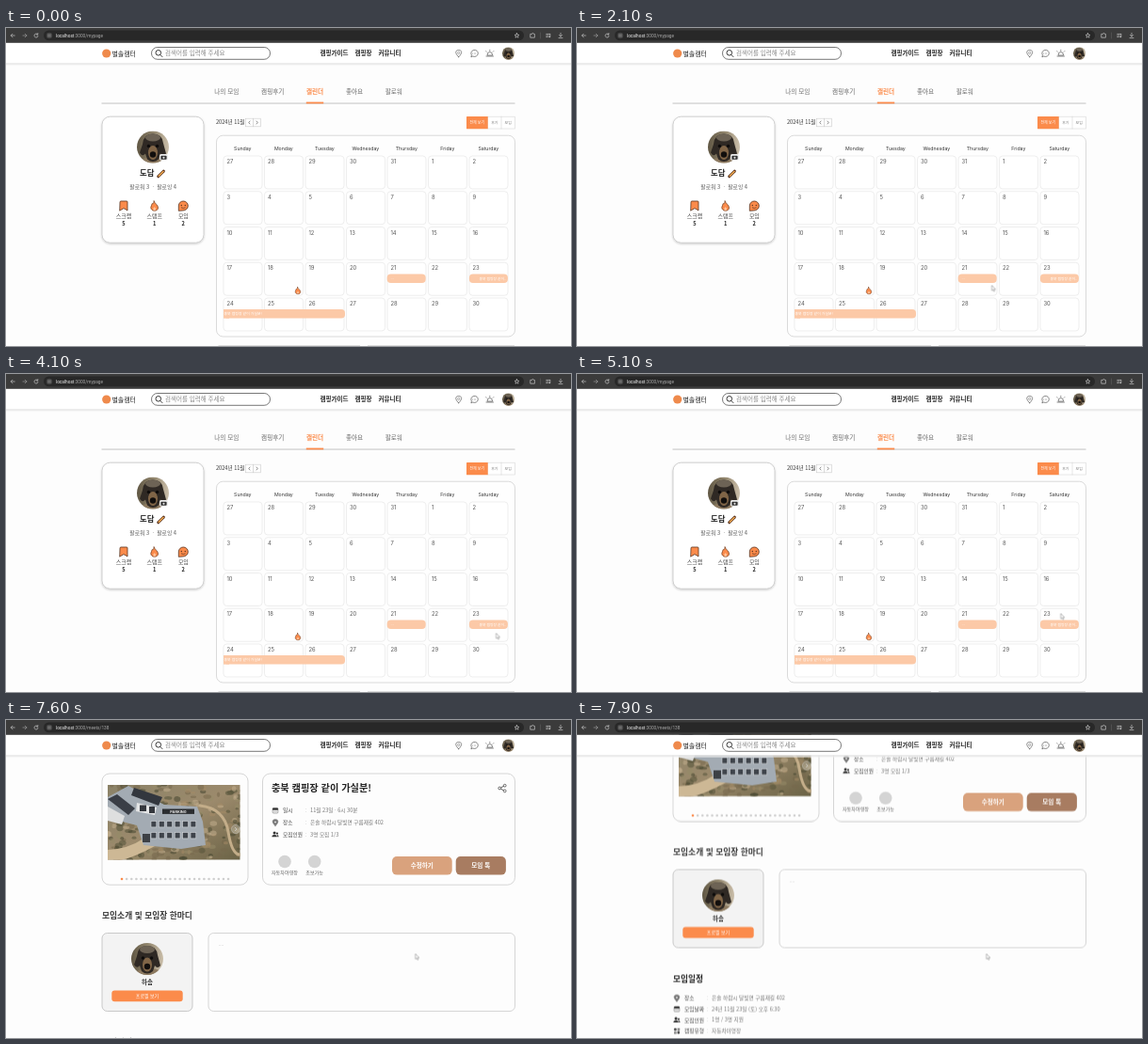
Write an HTML page that moves like this. It is 600 px wide and 338 px high and loops after 8000 ms.

```html
<!DOCTYPE html>
<html lang="ko">
<head>
<meta charset="utf-8">
<title>캠핑 캘린더</title>
<style>
html, body { margin: 0; width: 100%; height: 100%; overflow: hidden; background: #fdfdfd; }
svg { display: block; width: 600px; height: 338px; }
text { font-family: "Noto Sans CJK KR", "Noto Sans CJK", "Inter", sans-serif; }
.latin { font-family: "Inter", sans-serif; }
.url { font-family: "Roboto", sans-serif; }
.anim { animation: 8s linear infinite; }
#calendarPage, .calendarOnly { animation-name: leave; animation-timing-function: step-end; }
#meetPage, .meetOnly { animation-name: enter; animation-timing-function: step-end; }
#guest { animation-name: guest; animation-timing-function: step-end; }
#host { animation-name: host; animation-timing-function: step-end; }
#scroller { animation-name: scroll; }
#cursor { animation-name: move; }
#cursor path { animation-name: appear; animation-timing-function: step-end; }
@keyframes leave { 0% { opacity: 1 } 72.5%, 100% { opacity: 0 } }
@keyframes enter { 0% { opacity: 0 } 72.5%, 100% { opacity: 1 } }
@keyframes guest { 0% { opacity: 1 } 77.5%, 100% { opacity: 0 } }
@keyframes host { 0% { opacity: 0 } 77.5%, 100% { opacity: 1 } }
@keyframes appear { 0% { opacity: 0 } 5%, 100% { opacity: 1 } }
@keyframes scroll {
  0%, 95.2% { transform: translateY(0); animation-timing-function: cubic-bezier(.4, .2, .5, 1) }
  98.75%, 100% { transform: translateY(-67.5px) }
}
@keyframes move {
  0%, 10% { transform: translate(505px, 264px) }
  20%, 21.25% { transform: translate(268px, 296px) }
  26.25%, 31.25% { transform: translate(440.5px, 273.5px) }
  33.75% { transform: translate(512px, 273px) }
  37.5%, 60% { transform: translate(520.5px, 275.5px) }
  63.75% { transform: translate(513.7px, 254.5px) }
  67.5% { transform: translate(514px, 262px) }
  71.25%, 75% { transform: translate(515.5px, 264.5px) }
  82.5% { transform: translate(497px, 272px) }
  87.5%, 100% { transform: translate(434.7px, 248.5px) }
}
</style>
</head>
<body>
<svg id="stage" viewBox="0 0 600 338"></svg>
<script>
const ORANGE = '#fb8b4b', INK = '#222', GRAY = '#777';

const text = (x, y, str, size, { fill = INK, weight = 400, anchor = 'start', cls = '' } = {}) =>
  `<text class="${cls}" x="${x}" y="${y + size * 0.37}" font-size="${size}" font-weight="${weight}" fill="${fill}" text-anchor="${anchor}">${str}</text>`;
const mid = (x, y, str, size, opts) => text(x, y, str, size, { ...opts, anchor: 'middle' });
const rect = (x, y, w, h, r, fill, stroke = 'none', sw = 0.7, extra = '') =>
  `<rect x="${x}" y="${y}" width="${w}" height="${h}" rx="${r}" fill="${fill}" stroke="${stroke}" stroke-width="${sw}" ${extra}/>`;
const circle = (x, y, r, fill, stroke = 'none', sw = 0.7) =>
  `<circle cx="${x}" cy="${y}" r="${r}" fill="${fill}" stroke="${stroke}" stroke-width="${sw}"/>`;
const path = (d, stroke, sw = 0.8, fill = 'none') =>
  `<path d="${d}" fill="${fill}" stroke="${stroke}" stroke-width="${sw}" stroke-linecap="round" stroke-linejoin="round"/>`;
const shape = (d, fill) => `<path d="${d}" fill="${fill}"/>`;
const at = (x, y, body, scale = 1) => `<g transform="translate(${x} ${y}) scale(${scale})">${body}</g>`;
const group = (id, cls, body) => `<g id="${id}" class="${cls}">${body}</g>`;
const range = (n, fn) => Array.from({ length: n }, (_, i) => fn(i)).join('');

// Icons are centred on 0,0.
const pin = (stroke, fill, hole) => path('M0 4C-5 -1 -3.4 -3.7 0 -3.7S5 -1 0 4Z', stroke, 0.7, fill) + circle(0, -0.6, 1.2, hole, stroke, 0.5);
const flame = path('M-.6 -5C0 -2.5 3.8 -1 3.8 2C3.8 4.2 2 5.2 0 5.2S-3.9 4 -3.9 1.8C-3.9 0 -2.6 -.8 -2.5 -2.4C-1.2 -1.7 -.6 -3 -.6 -5Z', '#7a4425', 0.8, ORANGE)
  + shape('M0 5C-2 4.5 -1.8 2.5 0 1.2C1.8 2.5 2 4.5 0 5Z', '#ffc39a');
const bookmark = path('M-4 -4.2Q-4 -5 -3 -5H3Q4 -5 4 -4.2V5L0 2.6L-4 5Z', '#5a3420', 0.8, ORANGE);
const talk = path('M-5 5V0A5 5 0 1 1 0 5Z', '#5a3420', 0.8, ORANGE)
  + circle(-2, -0.5, 0.7, '#5a3420') + circle(2, -0.5, 0.7, '#5a3420') + path('M-2 2Q0 3.2 2 2', '#5a3420', 0.7);
const dateIcon = rect(-3.2, -3, 6.4, 6, 1, '#fff', '#666', 0.6) + rect(-3.2, -3, 6.4, 2.5, 0.8, '#333') + path('M-2 1H2', '#777', 0.6);
const people = circle(-1, -1.7, 1.7, '#333') + shape('M-4 3Q-4 .5 -1 .5T2 3Z', '#333')
  + circle(2.2, -1, 1.2, '#333') + shape('M2.5 3Q2.5 1 1.8 .6Q4 .5 4 3Z', '#333');
const kinds = circle(-1.8, -1.8, 1.6, '#444') + rect(0.6, -3.3, 3, 3, 0.6, '#888') + rect(-3.3, 0.6, 3, 3, 0.6, '#888') + circle(2, 2, 1.6, '#444');
const place = pin('#777', '#777', '#fff');

const dog = `<g clip-path="url(#round)">${rect(-17, -17, 34, 34, 0, 'url(#fur)')}
  <ellipse cx="2" cy="17" rx="15" ry="7" fill="#8d7a60"/>
  ${shape('M-11 -3Q-10 -14 0 -14T11 -4L14 7Q11 11 8 7L6 13Q0 18 -6 13L-8 7Q-11 11 -14 6Z', '#2f2924')}
  <ellipse cx="0" cy="-10" rx="8" ry="4" fill="#6d6355"/>
  <ellipse cx="0" cy="6" rx="5" ry="7.5" fill="#806547"/>
  <ellipse cx="0" cy="8" rx="3.2" ry="3.2" fill="#120f0d"/>
  ${circle(-4.6, -1, 1.7, '#0d0b0a')}${circle(4.6, -1, 1.7, '#0d0b0a')}</g>`;

const defs = `<defs>
  <clipPath id="round"><circle r="17"/></clipPath>
  <clipPath id="photo"><rect x="108" y="69" width="140.5" height="79.5"/></clipPath>
  <linearGradient id="fur"><stop stop-color="#5f5643"/><stop offset=".55" stop-color="#94886f"/><stop offset="1" stop-color="#cbbfab"/></linearGradient>
  <linearGradient id="woods" x2="1" y2="1"><stop stop-color="#8b8268"/><stop offset=".5" stop-color="#9c8a6c"/><stop offset="1" stop-color="#6a6245"/></linearGradient>
  <filter id="shade" x="-10%" y="-10%" width="120%" height="125%"><feDropShadow dx="0" dy="1" stdDeviation="1" flood-opacity=".22"/></filter>
</defs>`;

function browserBar() {
  const pale = '#c4c4c4';
  const icon = (d, color = pale) => path(d, color, 0.7);
  const url = (page, cls) => `<g class="anim ${cls}"><text class="url" x="53" y="9.7" font-size="4.75" fill="#aaa"><tspan fill="#f2f2f2">localhost</tspan>:3000/${page}</text></g>`;
  return rect(0, 0, 600, 15.8, 0, '#3b3b3b') + rect(40, 2.5, 510, 10.8, 5.4, '#282828')
    + icon('M9.2 8H5.2M7 6.2L5.2 8L7 9.8') + icon('M18 8H22M20.2 6.2L22 8L20.2 9.8', '#9a9a9a')
    + icon('M33.6 6.8A2 2 0 1 0 34 8.5M33.8 5.6V7H32.4')
    + circle(46, 8, 3.2, '#444') + path('M44.6 7.1H47.4M44.6 8.9H47.4', pale, 0.5)
    + url('mypage', 'calendarOnly') + url('meets/138', 'meetOnly')
    + icon('M542.5 5.6L543.2 7.2L544.9 7.4L543.6 8.5L544 10.2L542.5 9.3L541 10.2L541.4 8.5L540.1 7.4L541.8 7.2Z')
    + icon('M557.2 6.4H558.6A.9 .9 0 0 1 560.4 6.4H561.4V10.2H557.2Z') + path('M567.5 5V11', '#666', 0.5)
    + icon('M573.8 6.4H577.6M573.8 8H576M573.8 9.6H575.2M577.8 6.4V9.2') + circle(577.2, 9.4, 0.8, pale)
    + icon('M589 5.3V9M587.4 7.5L589 9.1L590.6 7.5M587 10.6H591');
}

function siteHeader() {
  const menu = { weight: 700 };
  return rect(0, 15.8, 600, 22, 0, '#fff') + rect(0, 37.6, 600, 0.9, 0, '#cfcfcf') + rect(0, 38.5, 600, 1, 0, '#efefef')
    + circle(106.7, 27, 4.6, '#ef8a4c') + text(112.5, 27, '별솔캠터', 6.9, { weight: 500 })
    + rect(154.5, 20.5, 126, 12.8, 6.4, '#fff', '#555', 0.8)
    + circle(161.8, 26.3, 2.8, 'none', '#222', 0.9) + path('M164 28.6L166 30.6', '#222', 0.9)
    + text(169, 26.8, '검색어를 입력해 주세요', 6.5, { fill: '#888' })
    + text(333.5, 26.5, '캠핑가이드', 6.5, menu) + text(370.5, 26.5, '캠핑장', 6.5, menu) + text(395.5, 26.5, '커뮤니티', 6.5, menu)
    + at(480.7, 27, pin('#555', 'none', 'none'), 0.95)
    + path('M494 30.5L494.4 28.8A3.7 3.6 0 1 1 496 30.2Z', '#555', 0.7)
    + range(3, i => circle(495.7 + i * 1.5, 27, 0.4, '#555'))
    + path('M510 30H517.5M511 28.7Q511 25.5 513.8 25.5T516.6 28.7ZM513.8 24.3V23.3M510.4 25.2L509.8 24.6M517.2 25.2L517.8 24.6', '#555', 0.7)
    + at(533.6, 27, dog, 0.39);
}

function profileCard() {
  const stat = (x, icon, label, n) => at(x, 189, icon) + mid(x, 199.5, label, 5.9, { fill: '#444' }) + mid(x, 208.3, n, 5.7, { weight: 700 });
  return rect(102, 94.2, 108, 134, 8.5, '#fff', '#bdbdbd', 0.7, 'filter="url(#shade)"')
    + at(156, 126.5, dog)
    + rect(163, 134, 9, 6.8, 2, '#eee') + rect(164.4, 135.8, 6.2, 4, 0.8, '#333') + circle(167.5, 137.8, 1.1, '#ddd')
    + text(142, 154.2, '도담', 8.4, { weight: 700 })
    + path('M161.7 157.8L167.3 152.2', '#5a3420', 3) + path('M162.3 157.2L167 152.5', '#f0a84f', 1.6)
    + mid(156.2, 169, '팔로워 3 &nbsp;·&nbsp; 팔로잉 4', 5.8, { fill: '#555' })
    + stat(125, bookmark, '스크랩', 5) + stat(157.7, flame, '스탬프', 1) + stat(188.3, talk, '모임', 2);
}

function calendar() {
  const days = ['Sunday', 'Monday', 'Tuesday', 'Wednesday', 'Thursday', 'Friday', 'Saturday'];
  const colX = c => 231 + c * 43.5, rowY = r => 136 + r * 37.75;
  const dayOf = i => i < 5 ? 27 + i : i - 4;
  const event = (x, y, w) => rect(x, y, w, 9.6, 4, '#fcc9a7');
  const white = { fill: '#fff', weight: 500 };
  return text(223, 100.3, '2024년 11월', 5.6, { fill: '#333' })
    + rect(254.5, 96.2, 8, 8.6, 0, '#fff', '#ccc', 0.6) + rect(262.5, 96.2, 8, 8.6, 0, '#fff', '#ccc', 0.6)
    + path('M259 99L257.8 100.5L259 102M266 99L267.2 100.5L266 102', '#444', 0.6)
    + rect(511.5, 94.2, 29, 12.8, 0, '#fff', '#d5d5d5', 0.6) + path('M526 94.2V107', '#d5d5d5', 0.6)
    + rect(489, 94, 22.7, 13.2, 0.5, ORANGE)
    + mid(500.3, 100.5, '전체 보기', 4, white) + mid(518.8, 100.5, '후기', 3.9, { fill: GRAY }) + mid(533.2, 100.5, '모임', 3.9, { fill: GRAY })
    + rect(223.5, 114.2, 317, 213.8, 7, '#fefefe', '#cacaca')
    + days.map((d, c) => mid(colX(c) + 20.3, 128.3, d, 5.2, { fill: '#333', cls: 'latin' })).join('')
    + range(35, i => {
      const x = colX(i % 7), y = rowY(Math.floor(i / 7));
      return rect(x, y, 41, 35, 3.5, '#fff', '#e3e3e3', 0.6) + text(x + 3.5, y + 6, dayOf(i), 5.8, { fill: '#555', cls: 'latin' });
    })
    + event(404.7, 261.5, 41) + text(408.5, 266.2, '···', 4, white)
    + event(491.9, 261.5, 41) + text(502.5, 266.2, '충북 캠핑장 같이..', 3.8, white)
    + event(231, 299, 129) + rect(231, 299, 6, 9.6, 0, '#fcc9a7') + text(231.5, 303.8, '충북 캠핑장 같이 가실분!', 3.9, white)
    + at(310, 279, flame, 0.72);
}

function calendarPage() {
  const tabs = [[234.3, '나의 모임'], [283.2, '캠핑후기'], [328, '캘린더'], [370, '좋아요'], [411.8, '팔로워']];
  return rect(0, 38, 600, 300, 0, '#fdfdfd')
    + tabs.map(([x, name], i) => mid(x, 67.2, name, 6.6, i === 2 ? { fill: ORANGE, weight: 700 } : { fill: '#666' })).join('')
    + rect(101.5, 79.6, 439, 0.9, 0, '#bcbcbc') + rect(318.8, 78.6, 18.4, 1.8, 0, ORANGE)
    + profileCard() + calendar()
    + rect(225.5, 337.2, 150.5, 0.8, 0, '#d5d5d5') + rect(384, 337.2, 156, 0.8, 0, '#d5d5d5');
}

function campPhoto() {
  const tones = ['#55533a', '#c2ad8c', '#77694e', '#968a69', '#454630', '#a58a66'];
  const rnd = i => { const v = Math.sin(i * 91.7) * 4375.5; return v - Math.floor(v); };
  const bushes = range(260, i => `<ellipse cx="${108 + rnd(i) * 141}" cy="${69 + rnd(i + 300) * 80}" rx="${1.5 + rnd(i + 600) * 3}" ry="${1 + rnd(i + 900) * 2.5}" fill="${tones[i % 6]}" opacity=".55"/>`);
  return `<g clip-path="url(#photo)">` + rect(108, 69, 141, 80, 0, 'url(#woods)') + bushes
    + shape('M108 138Q130 137 146 126L160 133Q136 146 122 149H108Z', '#cdb895')
    + path('M206 91Q232 94 236 119T249 143', '#c3ad89', 3)
    + shape('M108 82L130 70L168 90L203 92L209 108L212 133L186 137L146 133L139 112L108 104Z', '#a3abb3')
    + shape('M108 84L118 79L137 94L130 101Z', '#3a3e46') + shape('M136 72L166 82L162 91L133 80Z', '#33373e')
    + shape('M108 92L126 102L123 111L108 107Z', '#dedfdf') + shape('M139 88L160 93L158 101L138 97Z', '#e3e4e5')
    + rect(142, 90.5, 7, 6.5, 0, '#34373d') + rect(152, 92, 6, 7, 0, '#34373d')
    + rect(166, 94.5, 34, 5.4, 0, '#2b2d30') + mid(183, 97.2, 'PARKING', 3.9, { fill: '#eee', weight: 700, cls: 'latin' })
    + range(12, i => rect(154 + (i % 6) * 8.4, i < 6 ? 107.5 : 119.5, 5.8, 6.4, 0, '#3f444b', '#d2d6da', 0.6))
    + rect(145, 121, 8, 9, 0, '#3d4045') + '</g>';
}

function infoRow(x, y, icon, label, value) {
  return at(x, y, icon, 0.9) + text(x + 8, y, label, 5.7, { fill: '#444' })
    + text(x + 32, y, ':', 5.5, { fill: '#aaa' }) + text(x + 37, y, value, 5.65, { fill: GRAY });
}

function meetPage() {
  const address = '은솔 하람시 달빛면 구름재길 402';
  const white = { fill: '#fff', weight: 700 };
  const edge = '#c4c4c4';
  const buttons = (id, label, color) => group(id, 'anim',
    rect(410, 145, 63.7, 19.6, 5, '#d9a27d') + mid(441.8, 154.6, label, 6.6, white)
    + rect(477.7, 145, 53.2, 19.6, 5, color) + mid(504.2, 154.6, '모임 톡', 6.6, white));
  const chip = (x, label) => circle(x, 150.5, 6.8, '#d4d4d4') + mid(x, 161.8, label, 5.1, { fill: '#666' });
  const body = rect(102, 57, 155, 118.2, 8, '#fdfdfd', edge) + campPhoto()
    + circle(244, 116, 4.6, '#ffffff33', '#ccc', 0.4) + path('M243.2 114.2L245 116L243.2 117.8', '#ddd', 0.6)
    + range(23, i => circle(123 + i * 5.14, 169, 1.3, i ? '#cfcfcf' : ORANGE))
    + rect(272.5, 57, 268, 118.2, 8, '#fdfdfd', edge)
    + text(282, 72.3, '충북 캠핑장 같이 가실분!', 10.2, { weight: 700 })
    + path('M529.7 69.7L524.3 72.5L529.7 75.5', '#333') + circle(529.7, 69.7, 1.4, '#fff', '#333') + circle(524.2, 72.5, 1.4, '#fff', '#333') + circle(529.7, 75.4, 1.4, '#fff', '#333')
    + infoRow(286, 96.3, dateIcon, '일시', '11월 23일 · 6시 30분')
    + infoRow(286, 109, place, '장소', address)
    + infoRow(286, 121.5, people, '모집인원', '3명 모집 1/3')
    + chip(296, '자동차야영장') + chip(327.7, '초보가능')
    + buttons('guest', '신청하기', '#d3b9a8') + buttons('host', '수정하기', '#a87c61')
    + text(102, 208, '모임소개 및 모임장 한마디', 8.75, { weight: 700, fill: '#3a3a3a' })
    + rect(102, 226.5, 96, 83, 5.5, '#f3f3f3', '#b5b5b5') + at(150, 254, dog)
    + mid(150, 278.5, '하솜', 6.4, { weight: 700, fill: '#333' })
    + rect(112.3, 287.4, 75.4, 11.8, 3, ORANGE) + mid(150, 293.2, '프로필 보기', 5, { fill: '#fff', weight: 500 })
    + rect(215, 226.5, 325.5, 83, 5.5, '#fdfdfd', edge) + text(226, 238.5, '....', 4.5, { fill: '#999' })
    + text(102, 342.5, '모임일정', 8.7, { weight: 700 })
    + infoRow(106, 363.1, place, '장소', address)
    + infoRow(106, 374.8, dateIcon, '모임날짜', '24년 11월 23일 (토) 오후 6:30')
    + infoRow(106, 386.4, people, '모집인원', '1명 / 3명 지원')
    + infoRow(106, 398, kinds, '캠핑유형', '자동차야영장');
  return rect(0, 38, 600, 300, 0, '#fdfdfd') + group('scroller', 'anim', body);
}

const arrow = '<path class="anim" d="M0 0V5.6L1.3 4.5L2.2 6.5L3.1 6.1L2.3 4.2H4Z" fill="#fff" stroke="#777" stroke-width=".5"/>';

document.getElementById('stage').innerHTML = defs
  + group('calendarPage', 'anim', calendarPage())
  + group('meetPage', 'anim', meetPage())
  + siteHeader() + browserBar()
  + group('cursor', 'anim', arrow);
</script>
</body>
</html>
```
